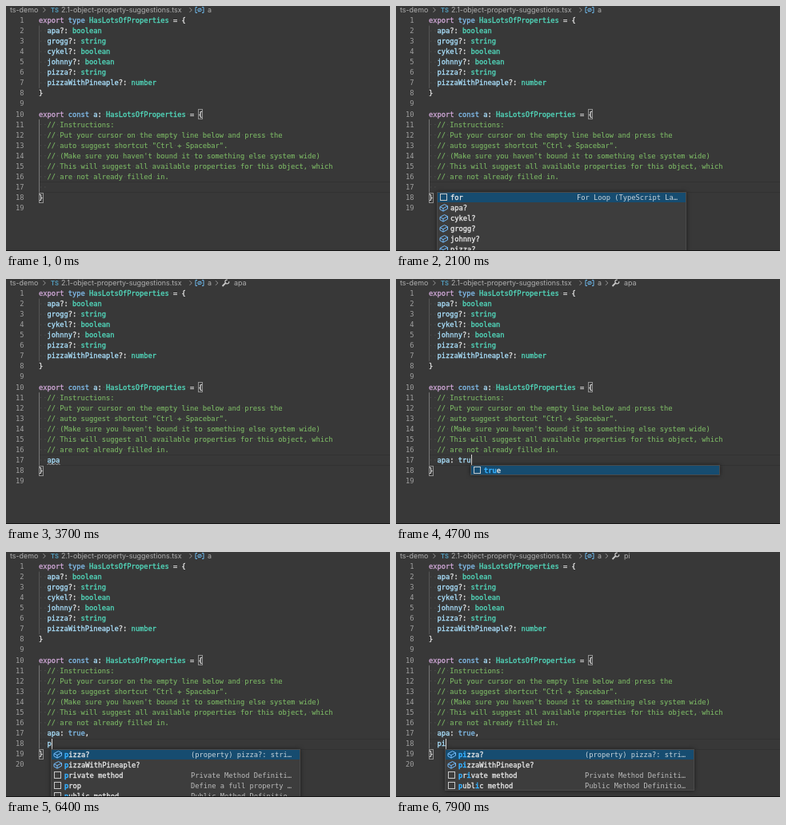
These frames come from a looping animation (480 by 307 pixels, 8000 ms). An HTML page with a canvas:

```html
<!DOCTYPE html>
<html lang="en">
<head>
<meta charset="utf-8">
<title>Property suggestions</title>
<style>
  html, body { margin: 0; height: 100%; overflow: hidden; background: #383838; }
  canvas { display: block; width: 480px; height: 307px; }
</style>
</head>
<body>
<canvas></canvas>
<script>
const W = 480, H = 307, LOOP = 8000;
const LEFT = 41, CHAR = 5.25, ROW = 13.06, FIRST = 18, POP_ROW = 13, POP_W = 312;
const MONO = '8.72px "DejaVu Sans Mono", monospace';
const SANS = '8.9px Inter, sans-serif';
const COLORS = {
  comment: '#7cb865', keyword: '#d0a8d8', storage: '#82bfee',
  type: '#52dcbf', name: '#abe2ff', plain: '#e8e8e8'
};

const HEAD = `export type HasLotsOfProperties = {
  apa?: boolean
  grogg?: string
  cykel?: boolean
  johnny?: boolean
  pizza?: string
  pizzaWithPineaple?: number
}

export const a: HasLotsOfProperties = {
  // Instructions:
  // Put your cursor on the empty line below and press the
  // auto suggest shortcut "Ctrl + Spacebar".
  // (Make sure you haven't bound it to something else system wide)
  // This will suggest all available properties for this object, which
  // are not already filled in.`.split('\n');

// Items are [label, detail, isProperty].
const prop = (name, type) => [name + '?', `(property) ${name}?: ${type} | undefined`, true];
const pizzas = [prop('pizza', 'string'), prop('pizzaWithPineaple', 'number')];
const privateMethod = ['private method', 'Private Method Definition'];
const publicMethod = ['public method', 'Public Method Definition Snippet'];
const all = [['for', 'For Loop (TypeScript Language)'], prop('apa', 'boolean'), prop('cykel', 'boolean'),
  prop('grogg', 'string'), prop('johnny', 'boolean'), prop('pizza', 'string')];
const trues = [['true', ''], ['try', 'Try-Catch Statement Snippet']];

// Each step holds until the next one; a key press restarts the caret blink.
const steps = [
  { at: 0, key: -600, text: '' },
  { at: 1000, key: -600, text: '', items: all, pick: 0 },
  { at: 2700, text: '', items: all, pick: 1, scrollbar: true },
  { at: 3000, text: 'apa' },
  { at: 3200, key: 3000, text: 'apa', crumb: 'apa' },
  { at: 3600, key: 3000, text: 'apa', crumb: 'apa', squiggle: true },
  { at: 4100, text: 'apa:', crumb: 'apa' },
  { at: 4200, text: 'apa: ', crumb: 'apa' },
  { at: 4400, text: 'apa: t', crumb: 'apa', items: trues, word: 't' },
  { at: 4600, text: 'apa: tr', crumb: 'apa', items: trues, word: 'tr' },
  { at: 4700, text: 'apa: tru', crumb: 'apa', items: trues.slice(0, 1), word: 'tru' },
  { at: 4900, text: 'apa: true', crumb: 'apa', items: trues.slice(0, 1), word: 'true' },
  { at: 5100, text: 'apa: true,', crumb: 'apa' },
  { at: 5300, key: 5100, text: 'apa: true,' },
  { at: 5800, text: 'apa: true,\n' },
  { at: 6400, text: 'apa: true,\np', word: 'p',
    items: [...pizzas, privateMethod, ['prop', 'Define a full property get set'], publicMethod] },
  { at: 7500, text: 'apa: true,\npi', word: 'pi', items: [...pizzas, privateMethod, publicMethod] },
  { at: 7600, key: 7500, text: 'apa: true,\npi', word: 'pi', crumb: 'pi',
    items: [...pizzas, privateMethod, publicMethod] }
];

const canvas = document.querySelector('canvas');
const ctx = canvas.getContext('2d');
const scale = window.devicePixelRatio || 1;
canvas.width = W * scale;
canvas.height = H * scale;
ctx.scale(scale, scale);

const rowY = i => FIRST + i * ROW;

// A thin outline of the given weight thickens the glyphs.
function write(text, x, y, color, { font = MONO, weight = 0 } = {}) {
  ctx.font = font;
  ctx.fillStyle = ctx.strokeStyle = color;
  ctx.fillText(text, x, y + 3);
  if (!weight) return;
  ctx.lineWidth = weight;
  ctx.strokeText(text, x, y + 3);
}

function fill(x, y, w, h, color) {
  ctx.fillStyle = color;
  ctx.fillRect(x, y, w, h);
}

function box(x, y, w, h, color) {
  ctx.strokeStyle = color;
  ctx.lineWidth = 1;
  ctx.strokeRect(x + .5, y + .5, w - 1, h - 1);
}

function path(points, color, width = 1) {
  ctx.beginPath();
  points.forEach(([x, y]) => ctx.lineTo(x, y));
  ctx.strokeStyle = color;
  ctx.lineWidth = width;
  ctx.stroke();
}

function tokenColor(token) {
  if (token.startsWith('//')) return COLORS.comment;
  if (token === 'export') return COLORS.keyword;
  if (/^(type|const|true)$/.test(token)) return COLORS.storage;
  if (/^(boolean|string|number|HasLots\w*)$/.test(token)) return COLORS.type;
  return /^\w/.test(token) ? COLORS.name : COLORS.plain;
}

function codeLine(line, y) {
  for (const { 0: token, index } of line.matchAll(/\/\/.*|\w+|[^\s\w]+/g)) {
    const color = tokenColor(token);
    write(token, LEFT + index * CHAR, y, color, { weight: color === COLORS.comment ? .1 : .3 });
  }
  for (const { index } of line.matchAll(/ /g))
    fill(LEFT + (index + .5) * CHAR - .5, y - .5, 1, 1, '#585858');
}

function chevron(x) {
  path([[x, 2.2], [x + 2.8, 5], [x, 7.8]], '#a0a0a0', .9);
}

function breadcrumbs(crumb) {
  const grey = '#b0b0b0', blue = '#6db6e8', sans = { font: SANS };
  write('ts-demo', 5, 5, grey, sans);
  chevron(46.5);
  write('TS', 56, 5, '#519aba', { font: 'bold 7.5px Inter, sans-serif' });
  write('2.1-object-property-suggestions.tsx', 69, 5, grey, sans);
  chevron(229.5);
  path([[239, 1.5], [237, 1.5], [237, 8.5], [239, 8.5]], blue);
  path([[245, 1.5], [247, 1.5], [247, 8.5], [245, 8.5]], blue);
  ctx.beginPath();
  ctx.ellipse(242, 5, 2.3, 1.8, 0, 0, 7);
  ctx.stroke();
  path([[240, 7.5], [244, 2.5]], blue, .7);
  write('a', 252, 5, grey, sans);
  if (!crumb) return;
  chevron(262);
  path([[270.5, 9], [275, 4.5]], '#c8c8c8', 1.8);
  ctx.beginPath();
  ctx.arc(276.3, 3.5, 2.4, -.2, 4.9);
  ctx.lineWidth = 1.2;
  ctx.stroke();
  write(crumb, 285, 5, grey, sans);
}

function itemIcon(x, y, isProperty) {
  if (!isProperty) return box(x, y - 4.6, 9, 9, '#c8c8c8');
  const blue = '#75beff';
  path([[x, y - 1], [x + 5.5, y - 4], [x + 9.5, y - 2], [x + 9.5, y + 1.5],
    [x + 4, y + 4.5], [x, y + 2.3], [x, y - 1], [x + 4, y + 1], [x + 9.5, y - 2]], blue);
  path([[x + 4, y + 1], [x + 4, y + 4.5]], blue);
}

function popup({ items, pick = 0, word = '', scrollbar }, x, top) {
  const height = items.length * POP_ROW;
  ctx.save();
  ctx.shadowColor = '#0008';
  ctx.shadowBlur = 5 * scale;
  fill(x, top, POP_W, height, '#3d3d3d');
  ctx.restore();
  items.forEach(([label, detail, isProperty], i) => {
    const y = top + i * POP_ROW + 6.6;
    if (i === pick) fill(x, top + i * POP_ROW, POP_W, POP_ROW, '#164c70');
    itemIcon(x + 4, y, isProperty);
    let matched = 0;
    [...label].forEach((letter, n) => {
      const hit = letter === word[matched];
      if (hit) matched++;
      write(letter, x + 17 + n * CHAR, y, hit ? '#35b0ff' : '#ebebeb', { weight: hit ? .6 : .3 });
    });
    if (isProperty && i !== pick) return;
    const short = detail.length > 24 ? detail.slice(0, 23) + '…' : detail;
    write(short, x + 301 - short.length * CHAR, y, i === pick ? '#c9d5dd' : '#bcbcbc');
  });
  box(x, top, POP_W, height, '#4a4a4a');
  if (scrollbar) fill(x + POP_W - 8, top, 7, 48, '#6c6c6c');
}

function draw(time) {
  const step = steps.findLast(s => s.at <= time);
  const typed = step.text.split('\n').map(line => '  ' + line);
  const lines = [...HEAD, ...typed, '}', ''];
  const active = lines.length - 3, close = lines.length - 2;
  const caretX = LEFT + lines[active].length * CHAR;
  const top = Math.round(rowY(active) - 6.5);

  fill(0, 0, W, H, '#383838');
  fill(LEFT, top, W - LEFT, 1, '#323232');
  fill(LEFT, top + 13, W - LEFT, 1, '#323232');
  fill(LEFT, rowY(1) - 6.5, 1, 6 * ROW, '#555');
  fill(LEFT, rowY(10) - 6.5, 1, (close - 10) * ROW, '#777');
  breadcrumbs(step.crumb);

  box(LEFT + 38 * CHAR - .5, Math.round(rowY(9) - 6.5), 6, 13, '#909090');
  box(LEFT, Math.round(rowY(close) - 6.5), 6, 13, '#909090');
  lines.forEach((line, i) => {
    const number = String(i + 1);
    write(number, 22.5 - number.length * CHAR, rowY(i), '#a0a0a0');
    codeLine(line, rowY(i));
  });

  if (step.squiggle) {
    const wave = Array.from({ length: 9 }, (_, i) => [51.5 + i * 2, i % 2 ? 231 : 233]);
    path(wave, '#c0c0c0', .8);
  }
  const idle = time - (step.key ?? step.at);
  if (Math.floor(idle / 500) % 2 === 0) fill(Math.round(caretX), top, 1, 13, '#d8d8d8');
  if (step.items) popup(step, Math.round(caretX - .6), top + 13);
  fill(0, H - 1, W, 1, '#141414');
}

function tick() {
  draw(performance.now() % LOOP);
  requestAnimationFrame(tick);
}
tick();
</script>
</body>
</html>
```
